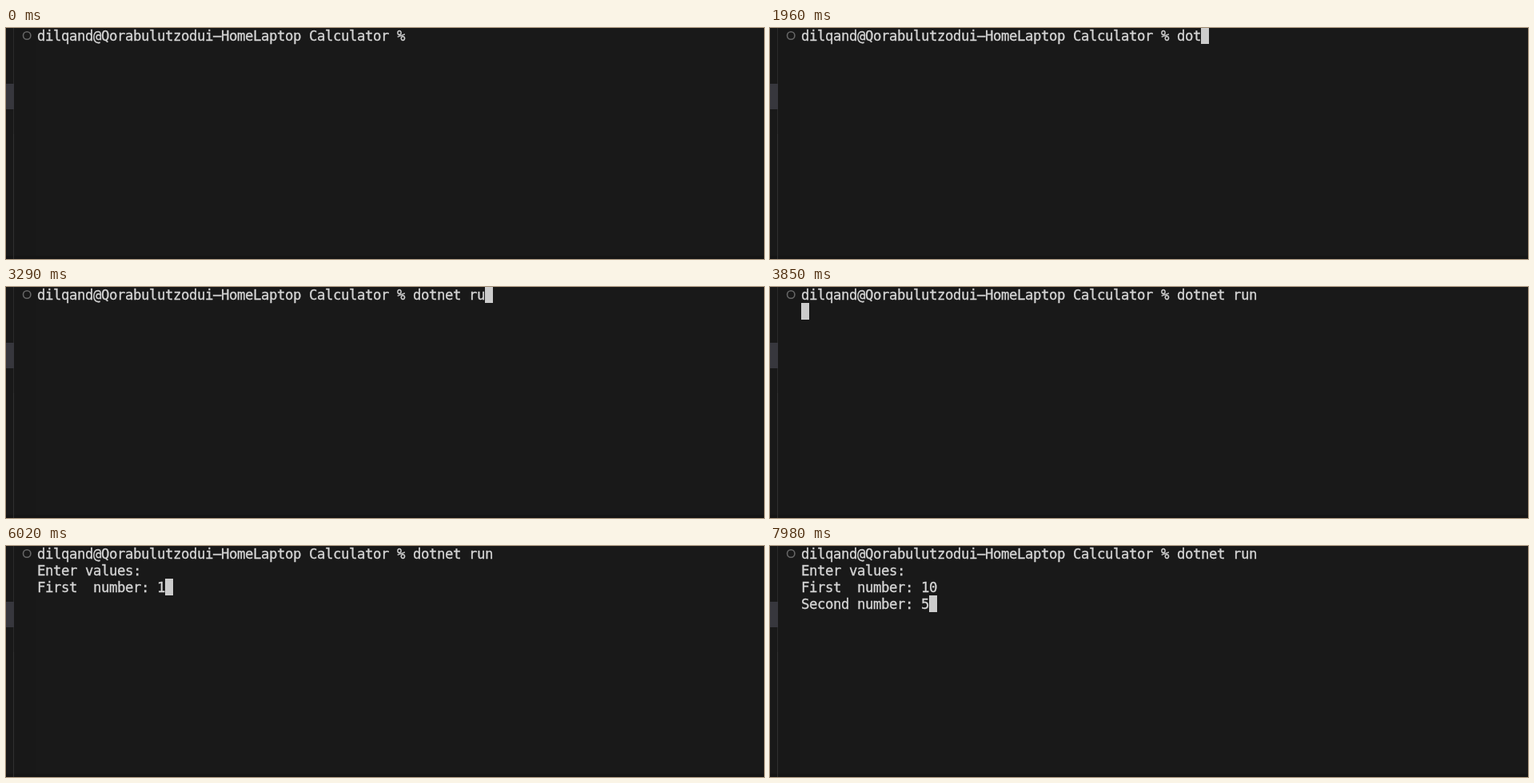
Recreate the animation shown at these times as an HTML page. Size 948x290 px, loop 8000 ms.

```html
<!DOCTYPE html>
<html lang="en">
<head>
<meta charset="utf-8">
<title>Terminal session</title>
<style>
  html, body { margin: 0; width: 100%; height: 100%; overflow: hidden; background: #191919; }
  #stage { position: relative; width: 948px; height: 290px; overflow: hidden; background: #191919; }
  #stage > * { position: absolute; }
  #gutter { left: 10px; top: 0; width: 28px; height: 286px; background: #181818; }
  #edge { left: 9px; top: 0; width: 1px; height: 133px; background: #2b2b2b; }
  #edge2 { left: 9px; top: 133px; width: 1px; height: 157px; background: #303030; }
  #thumb { left: 0; top: 70px; width: 10px; height: 32px; background: #37373d; }
  #foot { left: 0; top: 286px; width: 948px; height: 4px; background: #151515; }
  #mark { left: 20px; top: 3px; }
  #text {
    left: 39px; top: 0; margin: 0; color: #d4d4d4;
    font: 17.3px/21px "DejaVu Sans Mono", monospace;
    font-variant-ligatures: none;
    -webkit-text-stroke: 0.35px #d4d4d4;
  }
  #cursor { left: 39px; top: -1px; width: 10px; height: 21px; background: #cccccc; }
</style>
</head>
<body>
<div id="stage">
  <div id="gutter"></div>
  <div id="foot"></div>
  <div id="edge"></div>
  <div id="edge2"></div>
  <div id="thumb"></div>
  <svg id="mark" width="13" height="13">
    <circle cx="6.2" cy="6.5" r="4.7" fill="none" stroke="#666" stroke-width="1.6"/>
  </svg>
  <pre id="text"></pre>
  <div id="cursor"></div>
</div>
<script>
const LOOP = 8000, COL = 10, ROW = 21, CURSOR_ON = 560;

// [time in ms, text added to the terminal]
const steps = [
  [0, "dilqand@Qorabulutzodui\u2013HomeLaptop Calculator % "],
  [1400, "d"], [1610, "o"], [1960, "t"], [2450, "n"], [2590, "e"], [2800, "t"],
  [2870, " "], [3080, "r"], [3290, "u"], [3430, "n"], [3850, "\n"],
  [4620, "Enter values:\nFirst  number: "],
  [6020, "1"], [7000, "0"],
  [7490, "\nSecond number: "],
  [7980, "5"]
];

const text = document.getElementById("text");
const cursor = document.getElementById("cursor");
const start = performance.now();
let shown = null;

// Fit the font's advance to the terminal's whole-pixel cell.
function fitCell() {
  const count = 50;
  text.textContent = "0".repeat(count);
  const advance = text.getBoundingClientRect().width / count;
  text.style.letterSpacing = `${COL - advance}px`;
}

function draw(t) {
  const content = steps.filter(s => s[0] <= t).map(s => s[1]).join("");
  cursor.style.visibility = t < CURSOR_ON ? "hidden" : "visible";
  if (content === shown) return;
  shown = content;
  text.textContent = content;
  const lines = content.split("\n");
  const row = lines.length - 1;
  cursor.style.transform = `translate(${lines[row].length * COL}px, ${row * ROW}px)`;
}

function tick(now) {
  draw(Math.max(0, now - start) % LOOP);
  requestAnimationFrame(tick);
}

fitCell();
draw(0);
requestAnimationFrame(tick);
</script>
</body>
</html>
```
